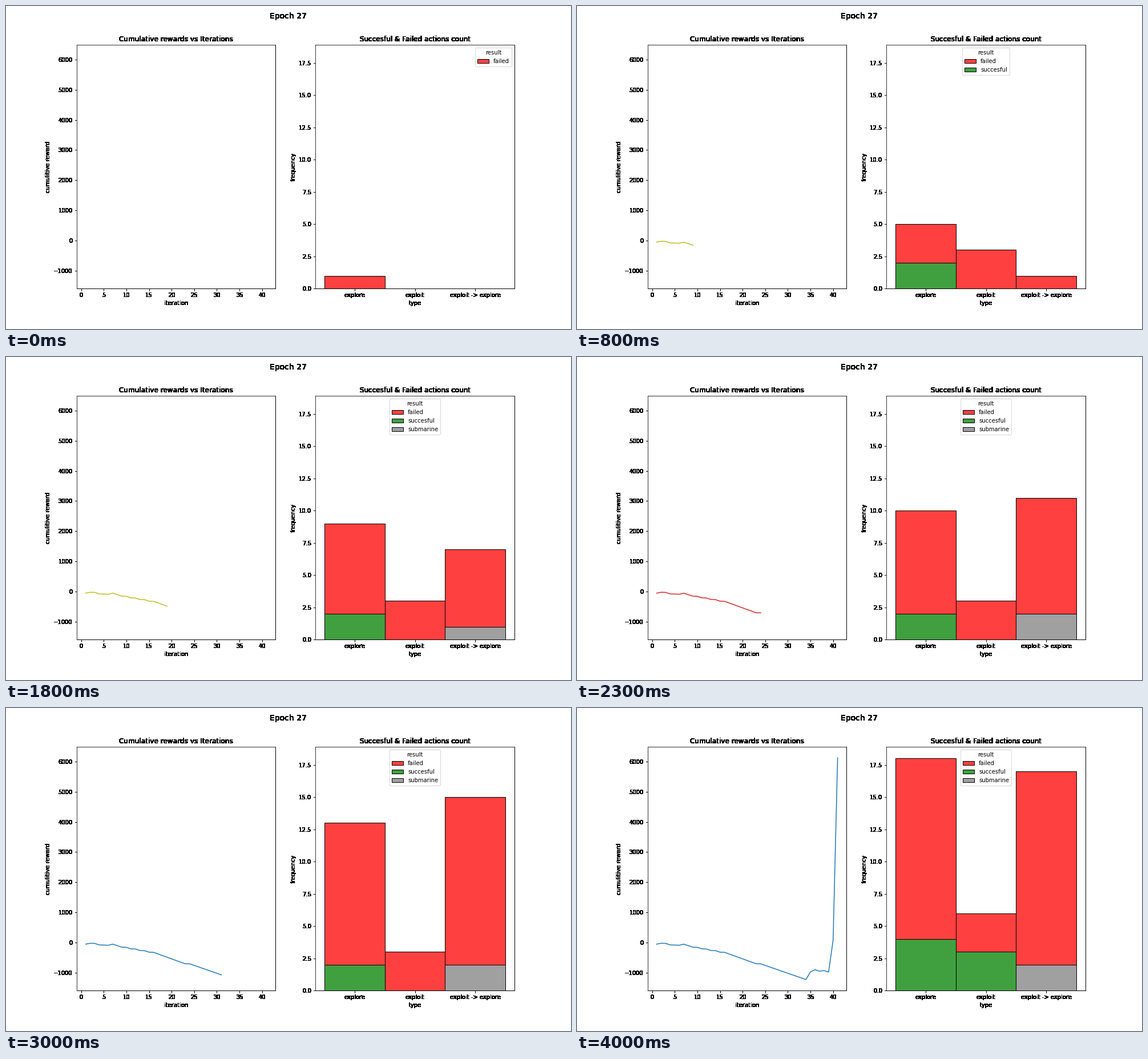
These frames come from a looping animation (990x566 px, 4.1 s). A matplotlib script:

```python
import numpy as np
import matplotlib.pyplot as plt
from matplotlib.animation import FuncAnimation
from matplotlib.colors import to_rgba
from matplotlib.patches import Patch

W, H, DPI = 990, 566, 72
STEPS = 41

# One letter per iteration: E explore, X exploit, R exploit -> explore
ACTIONS = "EEXXEEEX" + "RE" * 4 + "R" * 7 + "E" + "RE" * 5 + "EXRXEEX"
HITS = {2, 7, 35, 36, 38, 40, 41}
SUBMARINES = {17, 21}
RESULTS = {"failed": "red", "succesful": "green", "submarine": "gray"}

REWARDS = np.concatenate([
    [-50, -20, -25, -75, -80, -85, -50, -100, -150, -155],
    [-205, -210, -260, -265, -315, -320],
    np.linspace(-320, -700, 8)[1:],
    np.linspace(-702, -1222, 11),
    [-967, -897, -945, -925, -975, 75, 6121],
])


def count_results():
    """Running totals indexed by iteration, result and action type."""
    counts = np.zeros((STEPS + 1, len(RESULTS), 3), int)
    for n, action in enumerate(ACTIONS, 1):
        result = 1 if n in HITS else 2 if n in SUBMARINES else 0
        counts[n] = counts[n - 1]
        counts[n, result, "EXR".index(action)] += 1
    return counts


def bake_static_layer(fig):
    """Drop the alpha of a transparent render, which makes text edges solid."""
    fig.set_facecolor("none")
    fig.canvas.draw()
    rgb = np.array(fig.canvas.buffer_rgba())[..., :3]
    fig.set_facecolor("white")
    for ax in fig.axes:
        ax.set_axis_off()
    fig.figimage(rgb, origin="upper", zorder=-1)


plt.rcParams["font.family"] = "DejaVu Sans"
plt.rcParams["font.size"] = 10

fig, (line_ax, bar_ax) = plt.subplots(1, 2, figsize=(W / DPI, H / DPI), dpi=DPI)
fig.subplots_adjust(left=0.125, right=0.9, bottom=0.125, top=0.88, wspace=0.2)
fig.suptitle("Epoch 27", fontsize=14)

line_ax.set(title="Cumulative rewards vs Iterations",
            xlabel="iteration", ylabel="cumulitive reward",
            xlim=(-1, 43), ylim=(-1589, 6488),
            xticks=range(0, 41, 5), yticks=range(-1000, 6001, 1000))

bar_ax.set(title="Succesful & Failed actions count",
           xlabel="type", ylabel="frequency",
           xlim=(-0.65, 2.65), ylim=(0, 18.9),
           yticks=np.arange(0, 18, 2.5))
bar_ax.set_xticks(range(3), ["explore", "exploit", "exploit -> explore"])

bake_static_layer(fig)

counts = count_results()
line, = line_ax.plot([], [], lw=1.5)
styles = [dict(facecolor=to_rgba(color, 0.75), edgecolor="black", linewidth=1)
          for color in RESULTS.values()]
bars = [bar_ax.bar(range(3), [0] * 3, width=1, **style) for style in styles]
handles = [Patch(label=name, **style) for name, style in zip(RESULTS, styles)]


def update(frame):
    n = frame + 1
    line.set_data(np.arange(1, n + 1), REWARDS[:n])
    line.set_color(f"C{frame % 10}")

    # Stack from the last result up, so failures sit on top
    base = np.zeros(3)
    for group, heights in zip(bars[::-1], counts[n][::-1]):
        for bar, y, height in zip(group, base, heights):
            bar.set_y(y)
            bar.set_height(height)
        base = base + heights

    shown = 1 + (n >= min(HITS)) + (n >= min(SUBMARINES))
    bar_ax.legend(handles=handles[:shown], title="result",
                  loc="upper right" if shown == 1 else "upper center")
    return []


anim = FuncAnimation(fig, update, frames=STEPS, interval=100,
                     init_func=lambda: update(0), repeat=True, repeat_delay=0,
                     blit=False)
plt.show()
```
